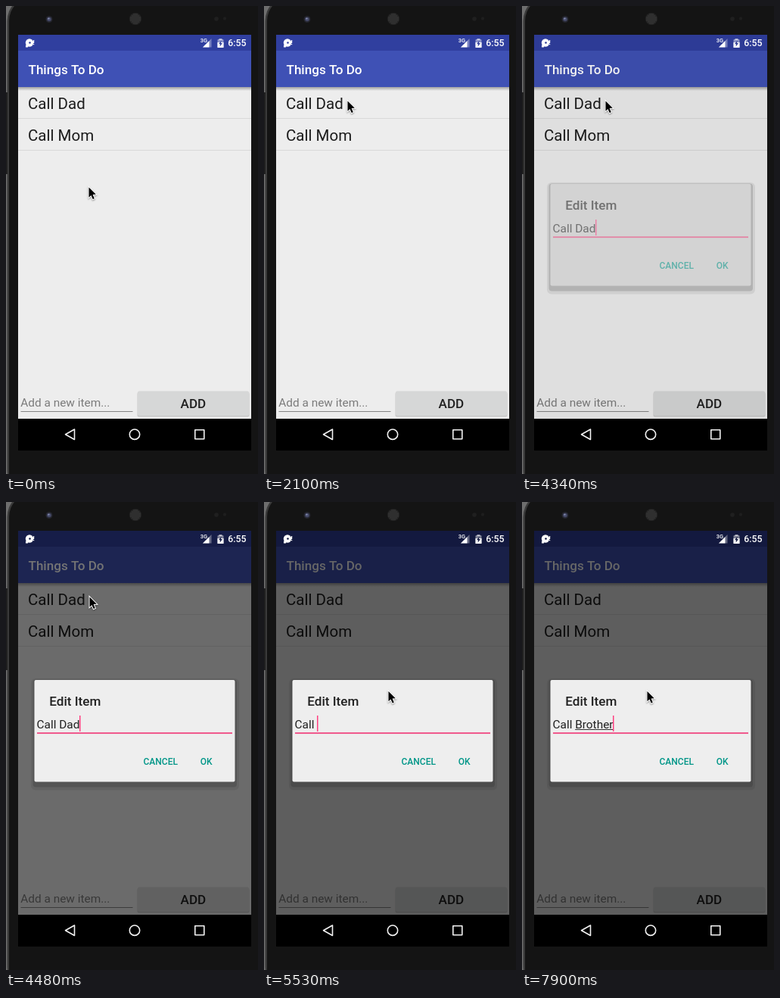
Recreate the animation shown at these times as an HTML page with a canvas. Size 333 px wide and 618 px high, loop 8000 ms.

```html
<!DOCTYPE html>
<html lang="en">
<head>
<meta charset="utf-8">
<title>Things To Do</title>
<style>
html, body { margin: 0; width: 100%; height: 100%; overflow: hidden; background: #141414; }
canvas { display: block; width: 100%; height: 100%; }
</style>
</head>
<body>
<canvas id="stage" width="333" height="618"></canvas>
<script>
const ctx = document.getElementById('stage').getContext('2d');
const LOOP = 8000;

// Each entry: start time, then the value held until the next entry.
const pointer = [
  [0, 109.5, 239.5], [900, 107, 234], [1050, 102, 212], [1200, 99.5, 185],
  [1350, 99.5, 160], [1500, 103, 143], [1650, 108, 131], [1800, 110, 127],
  [2100, 110.5, 125.5], [4630, 128, 164], [4780, 154, 228],
  [4930, 164.5, 250], [7900, 165.5, 250]
];
const scrim = [[0, 0], [4340, 0.06], [4480, 0.545], [4630, 0.6]];
const typed = [
  [0, 'Call Dad'], [5230, 'Call Da'], [5380, 'Call D'], [5530, 'Call '],
  ...[...'Brother'].map((c, i) => [6865 + i * 147, 'Call ' + 'Brother'.slice(0, i + 1)])
];
const caret = [[0, true], [5830, false], [6270, true], [6720, false], [6865, true]];

const at = (track, t) => track.filter(step => step[0] <= t).pop();

function rect(x, y, w, h, fill) {
  ctx.fillStyle = fill;
  ctx.fillRect(x, y, w, h);
}

function round(x, y, w, h, r, fill) {
  ctx.fillStyle = fill;
  ctx.beginPath();
  ctx.roundRect(x, y, w, h, r);
  ctx.fill();
}

function disc(x, y, r, fill) {
  ctx.fillStyle = fill;
  ctx.beginPath();
  ctx.arc(x, y, r, 0, 7);
  ctx.fill();
}

function trace(points) {
  ctx.beginPath();
  points.forEach(([x, y]) => ctx.lineTo(x, y));
  ctx.closePath();
}

function text(str, x, y, size, fill, weight = 400) {
  ctx.font = `${weight} ${size}px Roboto, sans-serif`;
  ctx.fillStyle = fill;
  ctx.fillText(str, x, y);
}

function fade(x, y, w, h, from, to) {
  const g = ctx.createLinearGradient(0, y, 0, y + h);
  g.addColorStop(0, from);
  g.addColorStop(1, to);
  rect(x, y, w, h, g);
}

function drawPhone() {
  rect(0, 0, 333, 618, '#6e6e6e');
  round(1.5, -14, 345, 660, 34, '#3a3a3a');
  round(4, -12, 345, 660, 32, '#141414');
  rect(0, 114, 2, 108, '#202020');

  disc(57, 17.5, 4.5, '#25262e');
  disc(57, 17.5, 2.8, '#454a68');
  disc(56.4, 16.6, 1.2, '#8086a8');

  disc(171, 17, 8, '#242424');
  for (let y = -6; y <= 6; y += 2) {
    for (let x = -6; x <= 6; x += 2) {
      if (x * x + y * y < 52) rect(170.5 + x, 16.5 + y, 1, 1, '#505050');
    }
  }
  disc(278, 17, 2.8, '#202020');
  disc(289, 16.5, 2.2, '#1e1e1e');
}

function drawApp(ripple) {
  rect(16, 38, 308, 507, '#ededed');
  if (ripple) {
    ctx.save();
    ctx.beginPath();
    ctx.rect(16, 108, 308, 40);
    ctx.clip();
    rect(16, 108, 308, 40, '#e2e2e2');
    disc(134.5, 128, 58.5, '#d7d7d7');
    ctx.restore();
  }
  rect(16, 148, 308, 1, '#d9d9d9');
  rect(16, 190, 308, 1, '#d9d9d9');
  text('Call Dad', 29, 136, 20.5, '#1c1c1c');
  text('Call Mom', 29, 178, 20.5, '#1c1c1c');

  rect(16, 38, 308, 21, '#303f9f');
  rect(16, 59, 308, 48, '#3f51b5');
  fade(16, 107, 308, 5, 'rgba(0,0,0,.32)', 'rgba(0,0,0,0)');
  text('Things To Do', 29.5, 90, 17.1, '#fff', 500);

  text('Add a new item...', 19.3, 529, 15.4, '#7b7b7b');
  rect(19.5, 535, 148, 1, '#858585');
  round(173.5, 510, 148, 32.5, 2, 'rgba(0,0,0,.16)');
  round(174, 508.5, 147, 32.5, 2, '#d6d7d7');
  text('ADD', 230.5, 531, 17.1, '#202020', 500);
}

function drawStatus(bar) {
  disc(31, 48.5, 5.2, '#fff');
  rect(26, 51.5, 3, 3, '#fff');
  disc(31.5, 48.5, 1.3, bar);
  rect(36, 45, 1.2, 4, '#fff');
  rect(36, 50, 1.2, 1.2, '#fff');

  text('3G', 256.7, 48, 7.5, '#fff', 500);
  ctx.fillStyle = 'rgba(255,255,255,.35)';
  trace([[271.5, 43], [271.5, 54.5], [260, 54.5]]);
  ctx.fill();
  ctx.fillStyle = '#fff';
  trace([[268.5, 46], [268.5, 54.5], [260, 54.5]]);
  ctx.fill();

  rect(281.5, 43, 4, 2, 'rgba(255,255,255,.6)');
  round(279.5, 44, 8, 11, 1, 'rgba(255,255,255,.45)');
  rect(279.5, 48, 8, 7, '#fff');
  ctx.fillStyle = bar;
  trace([[284.5, 45.5], [281, 50.3], [283, 50.3], [282.5, 53.7], [286, 49], [284, 49]]);
  ctx.fill();

  text('6:55', 293.3, 53.3, 12.3, '#fff', 500);
}

function drawNav() {
  rect(16, 545, 308, 42, '#000');
  ctx.strokeStyle = '#f2f2f2';
  ctx.lineWidth = 1.6;
  ctx.lineJoin = 'round';
  trace([[90.5, 559], [90.5, 572.5], [78.5, 565.7]]);
  ctx.stroke();
  ctx.beginPath();
  ctx.arc(170, 565.7, 6.7, 0, 7);
  ctx.stroke();
  ctx.strokeRect(249.8, 559.8, 12, 12);
}

function drawDialog(value, showCaret, alpha) {
  round(33, 233, 275, 147.5, 6, 'rgba(0,0,0,.07)');
  round(35.5, 234.5, 269.5, 142, 4, 'rgba(0,0,0,.14)');
  ctx.globalAlpha = alpha;
  round(37.5, 235, 265, 134.5, 2, '#eee');
  text('Edit Item', 57.3, 269, 17.1, '#212121', 500);
  text('CANCEL', 181.5, 346.7, 12, '#009688', 500);
  text('OK', 256.8, 346.7, 12, '#009688', 500);
  rect(41, 304.3, 258, 1.8, '#f0447f');

  const left = 40.5;
  text(value, left, 298.5, 15.4, '#212121');
  const end = left + ctx.measureText(value).width;
  if (value.length > 5 && value[5] === 'B') {
    const start = left + ctx.measureText('Call ').width;
    rect(start, 300, end - start, 1, '#333');
  }
  if (showCaret) rect(Math.round(end - 0.4), 282, 1.5, 21, '#ff4081');
  ctx.globalAlpha = 1;
}

function drawPointer(x, y) {
  ctx.save();
  ctx.translate(x, y);
  trace([[0, 0], [0, 13.2], [3, 10.4], [5.2, 15.6], [7.3, 14.7], [5.1, 9.6], [9.3, 9.3]]);
  ctx.lineJoin = 'miter';
  ctx.lineWidth = 2;
  ctx.strokeStyle = '#fff';
  ctx.shadowColor = 'rgba(0,0,0,.4)';
  ctx.shadowBlur = 2;
  ctx.shadowOffsetY = 1;
  ctx.stroke();
  ctx.shadowColor = 'transparent';
  ctx.fillStyle = '#000';
  ctx.fill();
  ctx.restore();
}

function draw(t) {
  const dim = at(scrim, t)[1];
  drawPhone();
  drawApp(t >= 4040 && t < 4340);
  if (dim) rect(16, 38, 308, 507, `rgba(0,0,0,${dim})`);
  const shade = [48, 63, 159].map(c => Math.round(c * (1 - dim)));
  drawStatus(`rgb(${shade})`);
  drawNav();
  if (dim) drawDialog(at(typed, t)[1], at(caret, t)[1], t < 4480 ? 0.55 : 1);
  const [, x, y] = at(pointer, t);
  drawPointer(x, y);
}

const begin = performance.now();
function tick() {
  draw((performance.now() - begin) % LOOP);
  requestAnimationFrame(tick);
}
tick();
</script>
</body>
</html>
```
